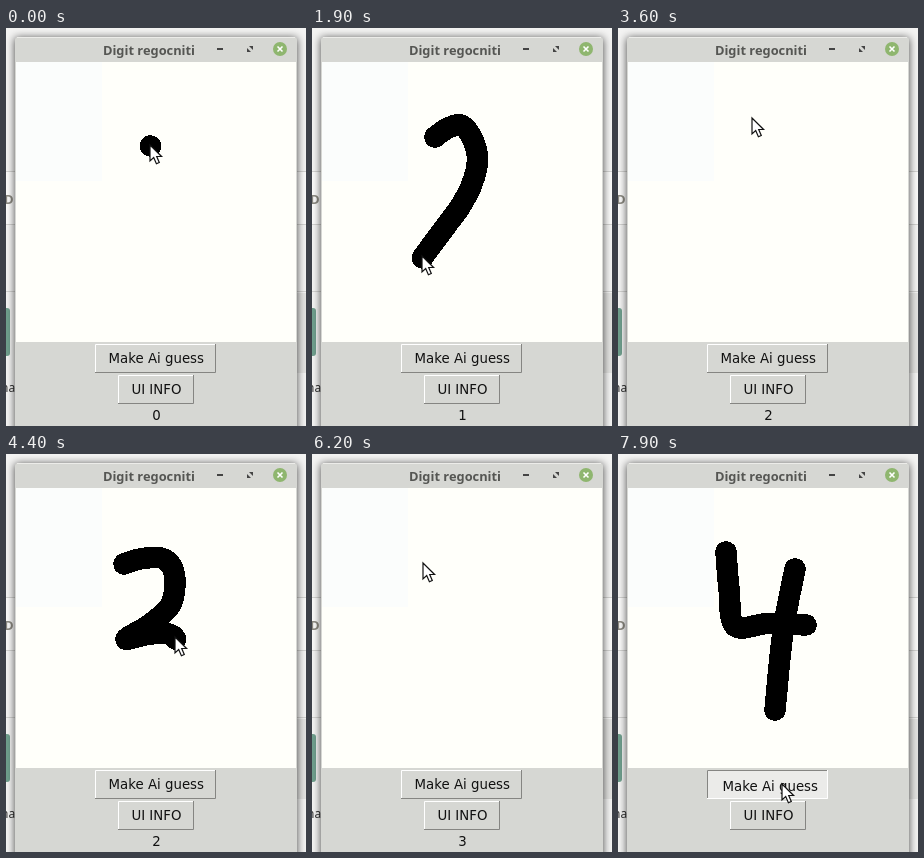
Write an HTML page that moves like this. It is 300 px wide and 398 px high and loops after 8000 ms.

```html
<!DOCTYPE html>
<html lang="en">
<head>
<meta charset="utf-8">
<title>Digit drawing</title>
<style>
  html, body { margin: 0; width: 100%; height: 100%; overflow: hidden; background: #f3f3f2; }
  svg { display: block; width: 300px; height: 398px; }
  text { font: 13.33px "DejaVu Sans", sans-serif; fill: #111; text-anchor: middle; }
  .title { font: 700 12.85px "Noto Sans", sans-serif; fill: #555653; }
  .behind { font: 700 13px "Noto Sans", sans-serif; fill: #8b8980; text-anchor: start; }
  .small { font-size: 12px; font-weight: 400; fill: #333; }
  #ink path { fill: none; stroke: #000; stroke-width: 21.5; stroke-linecap: round; stroke-linejoin: round; shape-rendering: crispEdges; }
  .edge { fill: none; stroke-width: 1; }
</style>
</head>
<body>
<svg viewBox="0 0 300 398">
  <defs>
    <filter id="blur" x="-10%" y="-10%" width="120%" height="120%"><feGaussianBlur stdDeviation="4.5"/></filter>
  </defs>

  <!-- page behind the window -->
  <rect width="300" height="398" fill="#f3f3f2"/>
  <rect y="143" width="300" height="54" fill="#fafaf9"/>
  <rect x="291" y="265" width="9" height="80" fill="#e2e2e0"/>
  <path d="M0 143.5H300M0 196.5H300M0 263.5H300" stroke="#d2d2d0"/>
  <rect x="-20" y="280" width="24" height="48" rx="3" fill="#6f9f8d"/>
  <text class="behind" x="-2" y="176">D</text>
  <text class="behind small" x="-5" y="364">na</text>
  <rect x="9" y="10" width="282" height="410" opacity=".72" filter="url(#blur)"/>

  <!-- window -->
  <path d="M9 398V12q0-3 3-3H288q3 0 3 3V398Z" fill="#d6d7d3"/>
  <path d="M11 9.5H289" stroke="#ecece9"/>
  <text class="title" x="143" y="27">Digit regocniti</text>
  <rect x="211" y="20" width="6" height="2" fill="#444"/>
  <path d="M243 18h4v4ZM241 20v4h4Z" fill="#444"/>
  <circle cx="274" cy="21" r="7" fill="#8fb66f"/>
  <path d="M271.5 18.5l5 5m0-5l-5 5" stroke="#fff" stroke-width="1.6"/>
  <rect x="10" y="34" width="280" height="280" fill="#fffffa"/>
  <rect x="10" y="34" width="86" height="119" fill="#fbfdfc"/>
  <g id="ink"></g>

  <rect id="face" x="89" y="316" width="121" height="29"/>
  <path class="edge" id="lit" d="M89.5 344V316.5H209"/>
  <path class="edge" id="dark" d="M89 344.5H209.5V316"/>
  <text id="guess" x="150.3" y="335">Make Ai guess</text>
  <path class="edge" d="M112.5 375V347.5H187" stroke="#fff"/>
  <path class="edge" d="M112 375.5H187.5V347" stroke="#858582"/>
  <text x="150.4" y="366">UI INFO</text>
  <text id="label" x="150.4" y="392">0</text>

  <path id="cursor" d="M0 0V16L3.7 12.6L6.4 18.8L9.3 17.5L6.7 11.5H11.6Z" fill="#fff" stroke="#111" stroke-width="1.2"/>
</svg>
<script>
const LOOP = 8000, STEP = 100, TRAVEL = 350, BUTTON_TOP = 316;
const $ = id => document.getElementById(id);

// Smooth path through a few points (Catmull-Rom)
function curve(text) {
  const p = text.split(" ").map(s => s.split(",").map(Number));
  const at = i => p[Math.min(p.length - 1, Math.max(0, i))];
  const handle = (i, sign) => at(i).map((v, k) => v + sign * (at(i + 1)[k] - at(i - 1)[k]) / 6);
  return "M" + p[0] + p.slice(1).map((q, i) => `C${handle(i, 1)} ${handle(i + 1, -1)} ${q}`).join("");
}

function stroke(from, to, points) {
  const path = document.createElementNS("http://www.w3.org/2000/svg", "path");
  path.setAttribute("d", curve(points));
  $("ink").append(path);
  const length = path.getTotalLength();
  const at = p => {
    const { x, y } = path.getPointAtLength(length * p);
    return [x - 0.5, y - 1.5];
  };
  return { path, from, to, length, at };
}

// Each round: draw a digit, then press and release the button
const rounds = [
  { press: 700, release: 900, strokes: [
    stroke(0, 300, "144.5,118 146,180 145,240")] },
  { press: 2850, release: 3200, strokes: [
    stroke(1300, 2200, "123,109 136,100 150,97.5 161,112 165.5,132 160,156 148,179 134,198 105,239 126,229 152,223 181,223")] },
  { press: 5450, release: 5900, hoverAt: [136, 88], strokes: [
    stroke(3800, 4800, "118,110 134,105 155,104 166,113 169,131 164,152 143,171 120,185 145,180 167,182 176,205 172,228 159,243 130,252 105,257 107,246")] },
  { press: 7800, release: LOOP, strokes: [
    stroke(6300, 6800, "108,98 111,135 117,172 150,169.5 188,171"),
    stroke(7000, 7300, "177,115 165,178 157,256")] }
];

const clamp = v => Math.min(1, Math.max(0, v));

// Pointer stops: each move eases from one stop to the next
const stops = [];
rounds.forEach((r, i) => {
  const aim = [158 + 2 * i, 328 + i / 2];
  if (i) stops.push([rounds[i - 1].release + TRAVEL, r.hoverAt || r.strokes[0].at(0)]);
  for (const s of r.strokes) stops.push([s.from, s.at(0)], [s.to, s.at(1)]);
  stops.push([r.press, aim], [r.release, aim]);
});

function pointer(t) {
  const s = rounds.flatMap(r => r.strokes).find(s => t >= s.from && t <= s.to);
  if (s) return s.at((t - s.from) / (s.to - s.from));
  const i = stops.findIndex(stop => stop[0] > t);
  const [t0, a] = stops[i - 1], [t1, b] = stops[i];
  const p = (t - t0) / (t1 - t0), e = p * p * (3 - 2 * p);
  return a.map((v, k) => v + (b[k] - v) * e);
}

function draw(t) {
  const [x, y] = pointer(t).map(Math.round);
  $("cursor").setAttribute("transform", `translate(${x} ${y})`);

  for (const r of rounds) for (const s of r.strokes) {
    const done = s.length * clamp((t - s.from) / (s.to - s.from));
    s.path.style.display = t >= s.from && t < r.release ? "" : "none";
    s.path.style.strokeDasharray = `${done + 0.01} 2000`;
  }

  const round = rounds.find(r => t < r.release);
  const pressed = t >= round.press;
  const hover = y >= BUTTON_TOP && t > round.strokes[0].from;
  $("face").setAttribute("fill", hover ? "#ebebe9" : "#d6d7d3");
  $("lit").setAttribute("stroke", pressed ? "#858582" : "#fff");
  $("dark").setAttribute("stroke", pressed ? "#fff" : "#858582");
  $("guess").setAttribute("transform", pressed ? "translate(2 1.5)" : "");
  $("label").textContent = pressed ? "" : rounds.indexOf(round);
}

function tick() {
  draw(Math.floor(performance.now() % LOOP / STEP) * STEP);
  requestAnimationFrame(tick);
}
tick();
</script>
</body>
</html>
```
